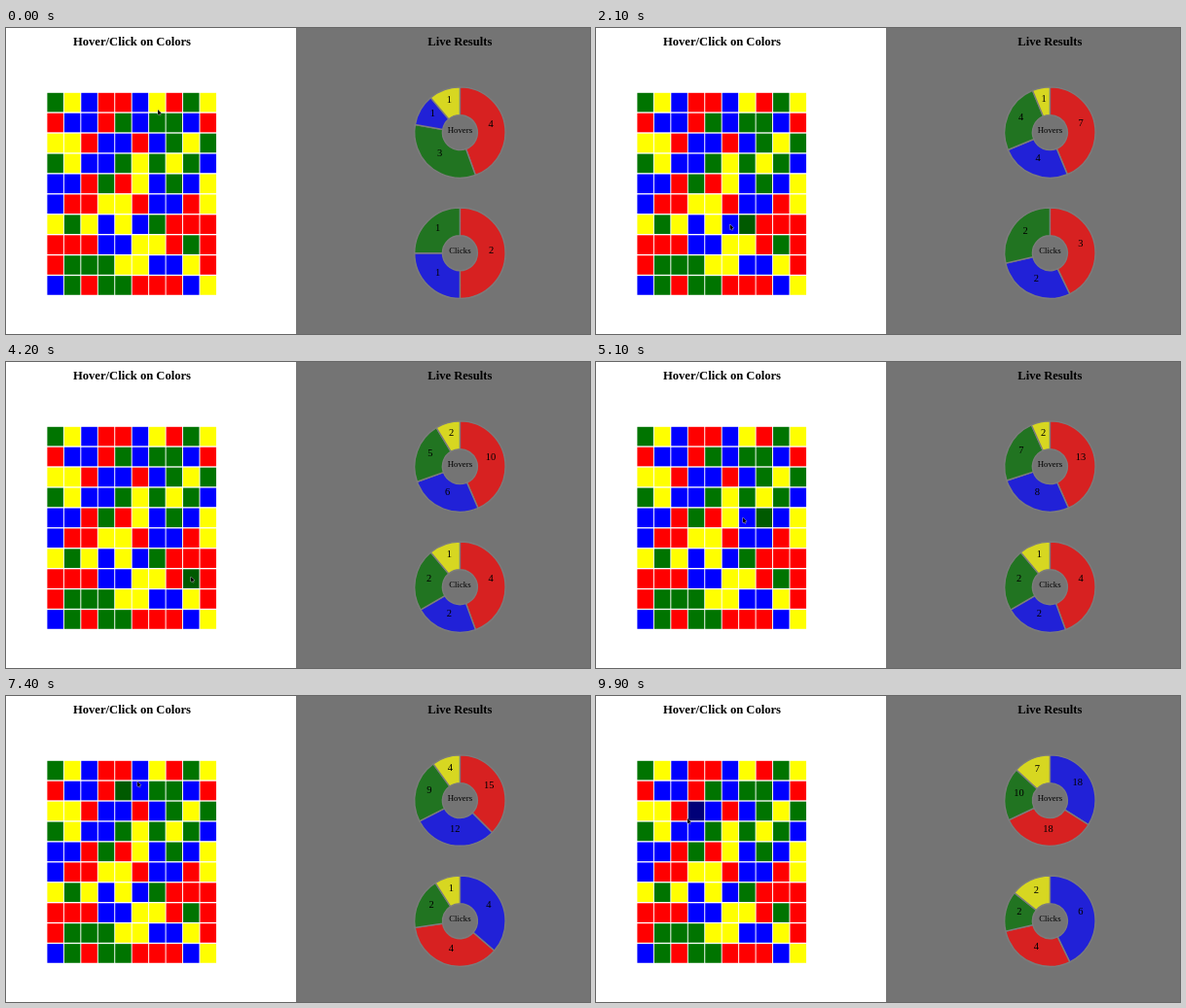
An HTML page with a canvas that plays this animation: 600x315 px, repeating every 10 s.

```html
<!DOCTYPE html>
<html lang="en">
<head>
<meta charset="utf-8">
<title>Live Results</title>
<style>
html, body { margin: 0; width: 600px; height: 315px; overflow: hidden; background: #fff; }
canvas { display: block; }
</style>
</head>
<body>
<canvas id="stage" width="600" height="315"></canvas>
<script>
const ctx = document.getElementById('stage').getContext('2d');
const LOOP = 10000, STEP = 100;
const GRAY = '#747474';
const GRID = { x: 42.4, y: 66.8, dx: 17.45, dy: 20.93, w: 16.5, h: 19.6 };
const ROWS = ['GYBRRBYRGY', 'RBBRGBGGBR', 'YYRBBRBGYG', 'GYBBGYGYGB', 'BBRGRYBGBY',
  'BRRYYRBBRY', 'YGYBYBGRRR', 'RRRBBYYRGR', 'RGGGYYBBYR', 'BGRGGRRRBY'];
const FILL = { B: '#0000ff', G: '#007400', R: '#ff0000', Y: '#ffff00' };
const DARK = { B: '#000078', G: '#005a00', R: '#7c0000', Y: '#c8be00' };
const SLICE = { B: '#2121d7', G: '#217421', R: '#d72121', Y: '#d7d721' };

// Each leg: end time, resting point, cells (column and row digits) hovered on the way
const LEGS = [
  [1100, 189, 161, '84'],
  [2900, 86, 120, '85 75 76 77 66 56 46 44 34 32'],
  [4000, 190, 221, '22 33 76'],
  [4200, 190, 221, ''],
  [6000, 180, 222, '87 97 86 85 75 74 64 54 43 33 52 65 67 77'],
  [7400, 135, 88, '68 11 41'],
  [9900, 94, 126, '51 62 52 53 64 65 55 45 44 34 02 23 32']
];
const CLICKS = [[600, 'G'], [1600, 'R'], [2000, 'B'], [2500, 'R'], [3600, 'Y'],
  [5400, 'B'], [6300, 'B'], [8200, 'B'], [8700, 'Y'], [9300, 'B']];

const points = [{ t: 0, x: 156, y: 84 }];
const hovers = [];
let legStart = 0;
for (const [end, x, y, list] of LEGS) {
  const cells = list ? list.split(' ') : [];
  cells.forEach(([col, row], i) => {
    const t = legStart + (end - legStart) * (i + 1) / (cells.length + 1);
    points.push({ t, x: GRID.x + col * GRID.dx + GRID.w / 2, y: GRID.y + row * GRID.dy + GRID.h / 2 });
    hovers.push([t, ROWS[row][col]]);
  });
  points.push({ t: end, x, y });
  legStart = end;
}

function cursorAt(t) {
  const i = points.findIndex(p => p.t >= t);
  if (i < 1) return points[0];
  const a = points[i - 1], b = points[i];
  const k = ((t - a.t) / (b.t - a.t)) ** 2;
  return { x: a.x + (b.x - a.x) * k, y: a.y + (b.y - a.y) * k };
}

function tally(start, events, t) {
  const count = { ...start };
  for (const [time, color] of events) if (time <= t) count[color]++;
  return count;
}

function text(str, x, y, size, weight = '') {
  ctx.font = `${weight} ${size}px "Liberation Serif", Times, serif`;
  ctx.textAlign = 'center';
  ctx.fillStyle = '#000';
  ctx.fillText(str, x, y);
}

function drawGrid(t) {
  const p = cursorAt(t - STEP);
  ROWS.forEach((row, r) => [...row].forEach((color, c) => {
    const x = GRID.x + c * GRID.dx, y = GRID.y + r * GRID.dy;
    const hot = t > 0 && p.x >= x && p.x < x + GRID.w && p.y >= y && p.y < y + GRID.h;
    ctx.fillStyle = (hot ? DARK : FILL)[color];
    ctx.fillRect(x, y, GRID.w, GRID.h);
  }));
}

function drawDonut(label, count, cx, cy) {
  const entries = Object.entries(count).filter(e => e[1]).sort((a, b) => b[1] - a[1]);
  const total = entries.reduce((sum, e) => sum + e[1], 0);
  let from = -Math.PI / 2;
  const labels = [];
  for (const [color, n] of entries) {
    const to = from + n / total * 2 * Math.PI, mid = (from + to) / 2;
    ctx.beginPath();
    ctx.arc(cx, cy, 46.7, from, to);
    ctx.arc(cx, cy, 18, to, from, true);
    ctx.closePath();
    ctx.fillStyle = SLICE[color];
    ctx.fill();
    ctx.strokeStyle = '#7c7c7c';
    ctx.lineWidth = 1.4;
    ctx.stroke();
    labels.push([n, cx + 32.3 * Math.cos(mid), cy + 32.3 * Math.sin(mid)]);
    from = to;
  }
  for (const [n, x, y] of labels) text(n, x, y, 10.5);
  text(label, cx, cy + 0.5, 8.8);
}

function drawCursor({ x, y }) {
  ctx.beginPath();
  [[0, 0], [0, 5.2], [1.2, 4.2], [2, 6], [2.9, 5.6], [2.1, 3.9], [3.7, 3.8]]
    .forEach(([dx, dy]) => ctx.lineTo(x + dx, y + dy));
  ctx.closePath();
  ctx.strokeStyle = '#ddd';
  ctx.lineWidth = 0.7;
  ctx.stroke();
  ctx.fillStyle = '#000';
  ctx.fill();
}

function draw(now) {
  const t = Math.floor(now % LOOP / STEP) * STEP;
  ctx.fillStyle = '#fff';
  ctx.fillRect(0, 0, 298, 315);
  ctx.fillStyle = GRAY;
  ctx.fillRect(298, 0, 302, 315);
  text('Hover/Click on Colors', 129.5, 18, 12.6, 'bold');
  text('Live Results', 466.3, 18, 12.6, 'bold');
  drawGrid(t);
  drawDonut('Hovers', tally({ B: 1, G: 3, R: 4, Y: 1 }, hovers, t), 466.4, 107.6);
  drawDonut('Clicks', tally({ B: 1, G: 1, R: 2, Y: 0 }, CLICKS, t), 466.4, 231.7);
  drawCursor(cursorAt(t));
  requestAnimationFrame(() => draw(performance.now() - start));
}

const start = performance.now();
draw(0);
</script>
</body>
</html>
```
